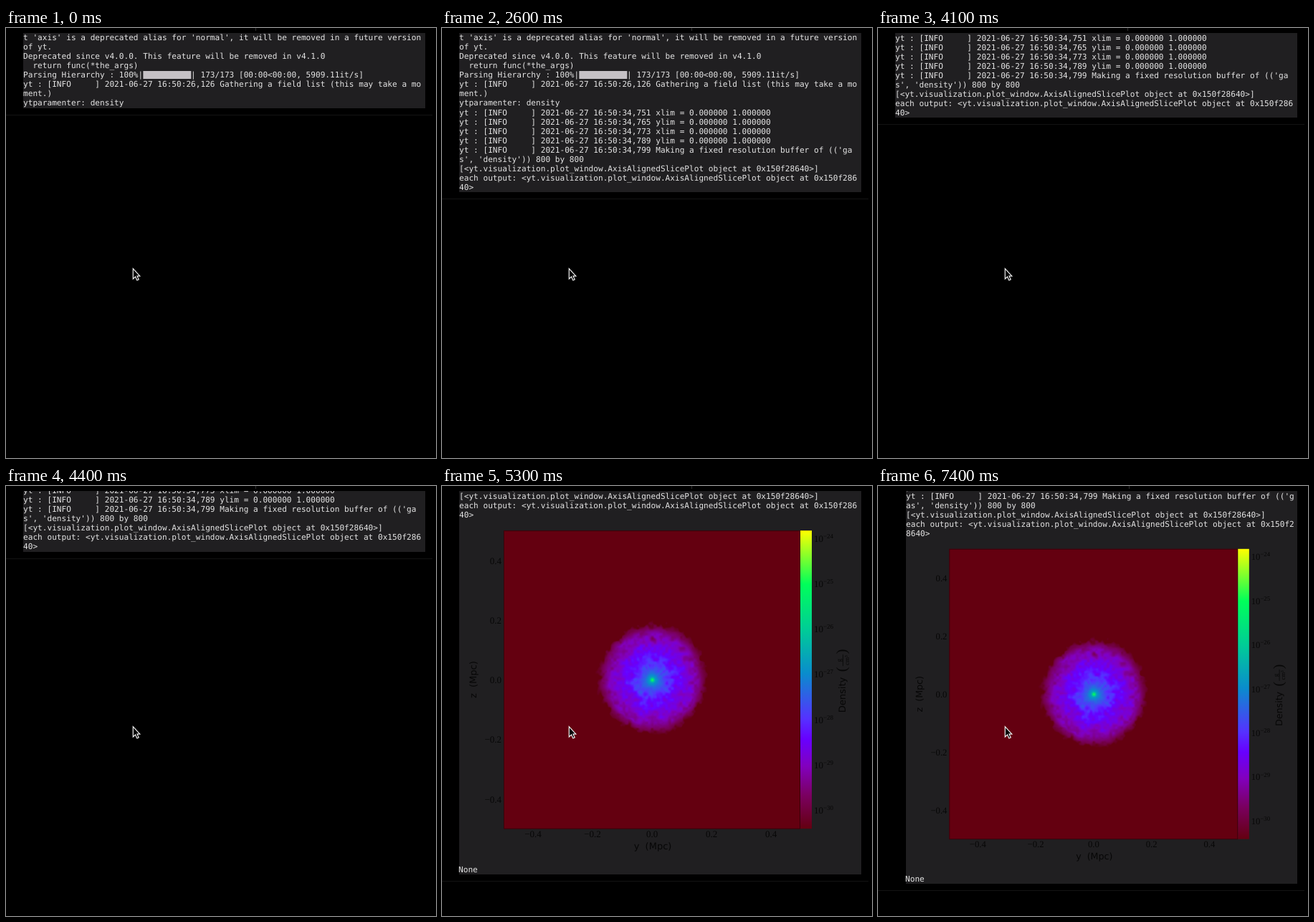
Write an HTML page with a canvas that moves like this. It is 600 by 600 pixels and loops after 7900 ms.

```html
<!DOCTYPE html>
<html>
<head>
<meta charset="utf-8">
<style>
html, body { margin: 0; width: 100%; height: 100%; overflow: hidden; background: #000; }
canvas { display: block; }
</style>
</head>
<body>
<canvas id="stage" width="600" height="600"></canvas>
<script>
const ctx = document.getElementById('stage').getContext('2d');
ctx.textRendering = 'geometricPrecision';

const LOOP = 7900, PITCH = 13.07, TOP = 7, RIGHT = 585, CHAR = 6.695;
const INK = '#e4e4e4';
const MONO = '11.12px "DejaVu Sans Mono", monospace';
const SANS = '13px "DejaVu Sans", sans-serif';
const serif = size => size + 'px "Liberation Serif", serif';

const log = (time, text) => `yt : [INFO     ] 2021-06-27 16:50:${time} ${text}`;
const slice = '<yt.visualization.plot_window.AxisAlignedSlicePlot object at 0x150f2';
const wide = [
  "t 'axis' is a deprecated alias for 'normal', it will be removed in a future version",
  'of yt.',
  'Deprecated since v4.0.0. This feature will be removed in v4.1.0',
  '  return func(*the_args)',
  'Parsing Hierarchy : 100%|          | 173/173 [00:00<00:00, 5909.11it/s]',
  log('26,126', 'Gathering a field list (this may take a mo'),
  'ment.)',
  'ytparamenter: density',
  log('34,751', 'xlim = 0.000000 1.000000'),
  log('34,765', 'ylim = 0.000000 1.000000'),
  log('34,773', 'xlim = 0.000000 1.000000'),
  log('34,789', 'ylim = 0.000000 1.000000'),
  log('34,799', "Making a fixed resolution buffer of (('ga"),
  "s', 'density')) 800 by 800",
  `[${slice}8640>]`,
  `each output: ${slice}86`,
  '40>'
];
const narrow = [
  ...wide.slice(0, 12),
  log('34,799', "Making a fixed resolution buffer of (('g"),
  "as', 'density')) 800 by 800",
  wide[14],
  `each output: ${slice}`,
  '8640>'
];

// Linear interpolation through [x, y] points
function track(points, x) {
  if (x <= points[0][0]) return points[0][1];
  for (let i = 1; i < points.length; i++) {
    const [x0, y0] = points[i - 1], [x1, y1] = points[i];
    if (x <= x1) return y0 + (y1 - y0) * (x - x0) / (x1 - x0);
  }
  return points[points.length - 1][1];
}

const scrollPath = [
  [3500, 0], [3600, 4], [3700, 16], [3800, 38], [4000, 86], [4100, 104],
  [4300, 127], [4600, 159], [4900, 182], [5400, 182], [5500, 174], [5700, 162], [6000, 156]
];

const colors = [
  [0, 100, 0, 16], [.11, 122, 0, 95], [.21, 130, 0, 190], [.3, 104, 0, 255], [.37, 85, 50, 255],
  [.52, 10, 140, 205], [.67, 0, 205, 150], [.82, 0, 255, 90], [1, 255, 255, 0]
];
const colorAt = v => [1, 2, 3].map(c => track(colors.map(s => [s[0], s[c]]), v));

function hash(x, y) {
  const h = Math.sin(x * 127.1 + y * 311.7) * 43758.5453;
  return h - Math.floor(h);
}
function noise(x, y) {
  const ix = Math.floor(x), iy = Math.floor(y);
  const ease = f => f * f * (3 - 2 * f);
  const u = ease(x - ix), v = ease(y - iy);
  const row = j => hash(ix, j) * (1 - u) + hash(ix + 1, j) * u;
  return row(iy) * (1 - v) + row(iy + 1) * v - .5;
}

// Density halo, rendered once
const HALO = 200;
const profile = [
  [0, .85], [2, .7], [4, .56], [10, .46], [20, .375], [36, .295],
  [52, .22], [64, .17], [70, .1], [76, 0]
];
const halo = document.createElement('canvas');
halo.width = halo.height = HALO;
{
  const g = halo.getContext('2d'), img = g.createImageData(HALO, HALO);
  const lut = Array.from({ length: 256 }, (_, i) => colorAt(i / 255));
  for (let y = 0; y < HALO; y++) for (let x = 0; x < HALO; x++) {
    const dx = x - HALO / 2, dy = y - HALO / 2;
    const r = Math.hypot(dx, dy * (dy < 0 ? .96 : 1.01));
    const grain = noise(x / 7, y / 7) * .6 + noise(x / 4 + 40, y / 4) * .6;
    const ray = noise(Math.atan2(dy, dx) * 8 + 60, r / 9);
    let v = track(profile, r + 11 * grain * Math.min(1, r / 60));
    v += (grain * .15 + ray * .05) * Math.min(1, r / 25) * Math.min(1, v / .15);
    v -= .12 * Math.exp(-(dx * dx + (dy + 57) ** 2) / 12);
    const i = Math.round(255 * Math.max(0, Math.min(1, v)));
    img.data.set([...lut[i], 255], 4 * (y * HALO + x));
  }
  g.putImageData(img, 0, 0);
}

function text(str, x, y, font, align = 'left') {
  ctx.font = font;
  ctx.textAlign = align;
  ctx.fillText(str, x, y);
}

function turned(x, y, draw) {
  ctx.save();
  ctx.translate(x, y);
  ctx.rotate(-Math.PI / 2);
  draw();
  ctx.restore();
}

function drawPlot() {
  ctx.fillStyle = '#640010';
  ctx.fillRect(86, 62, 414, 416);
  ctx.drawImage(halo, 293 - HALO / 2, 270 - HALO / 2);
  ctx.strokeStyle = '#3a000a';
  ctx.lineWidth = 1;
  ctx.strokeRect(86.5, 62.5, 413, 415.5);
  const bar = ctx.createLinearGradient(0, 478, 0, 62);
  for (const [v, ...rgb] of colors) bar.addColorStop(v, `rgb(${rgb})`);
  ctx.fillStyle = bar;
  ctx.fillRect(500, 62, 16, 416);

  ctx.fillStyle = '#070707';
  for (let i = -2; i <= 2; i++) {
    const label = (i < 0 ? '−' : '') + Math.abs(i / 5).toFixed(1);
    text(label, 83, 275 - i * 83.3, serif(13), 'right');
    text(label, 293 + i * 83, 490, serif(13), 'center');
  }
  for (let i = 0; i < 7; i++) {
    const y = 78 + i * 63.1;
    text('10', 519, y, serif(13));
    text('−' + (24 + i), 532, y - 5, serif(9));
  }
  text('y  (Mpc)', 294, 507, SANS, 'center');
  turned(48, 270, () => text('z  (Mpc)', 0, 0, SANS, 'center'));
  turned(563, 316, () => {
    text('Density', 0, 0, SANS);
    text('(', 57, 1, serif(20));
    text('g', 73, -6, serif(9), 'center');
    text('cm³', 73, 5, serif(9), 'center');
    ctx.fillRect(65, -4, 16, .8);
    text(')', 82, 1, serif(20));
  });
}

const cursor = new Path2D('M177.3 335.8V350L180.5 347L182.8 352L185.2 351L183 346.2H186.8Z');

function draw(t) {
  const hasPlot = t >= 5300, slim = t >= 5400;
  const left = slim ? 39 : 24;
  const scale = (RIGHT - left) / (RIGHT - 24);
  const lines = slim ? narrow : wide;
  const count = t < 1300 ? 8 : t < 1800 ? 9 : t < 2100 ? 12 : t < 2600 ? 14 : 17;
  const scroll = track(scrollPath, Math.floor(t / 100) * 100);
  const start = TOP - scroll;
  const textEnd = start + count * PITCH;
  const end = hasPlot ? textEnd + 481.5 * scale + PITCH : textEnd;

  ctx.fillStyle = '#000';
  ctx.fillRect(0, 0, 600, 600);
  ctx.fillStyle = '#303030';
  ctx.fillRect(slim ? 350 : 348, 0, 1, 4);
  ctx.fillStyle = '#131313';
  ctx.fillRect(0, Math.round(end + 9), 595, 1);

  ctx.save();
  ctx.beginPath();
  ctx.rect(0, TOP, 600, 600);
  ctx.clip();
  ctx.fillStyle = '#201f21';
  ctx.fillRect(left, TOP, RIGHT - left, Math.round(end) - TOP);

  ctx.fillStyle = INK;
  for (let i = 0; i < count; i++) text(lines[i], left, Math.round(start + i * PITCH + 10), MONO);
  ctx.fillStyle = '#c5c1c5';
  ctx.fillRect(left + 25 * CHAR, Math.round(start + 4 * PITCH + 1), 10 * CHAR, 11);

  if (hasPlot) {
    ctx.fillStyle = INK;
    text('None', left - 1, Math.round(end - 3), MONO);
    ctx.translate(left - 24 * scale, textEnd - 47 * scale);
    ctx.scale(scale, scale);
    drawPlot();
  }
  ctx.restore();

  ctx.fillStyle = '#000';
  ctx.fill(cursor);
  ctx.strokeStyle = '#eee';
  ctx.lineWidth = 1.2;
  ctx.stroke(cursor);
}

const began = performance.now();
function tick() {
  draw((performance.now() - began) % LOOP);
  requestAnimationFrame(tick);
}
tick();
</script>
</body>
</html>
```
